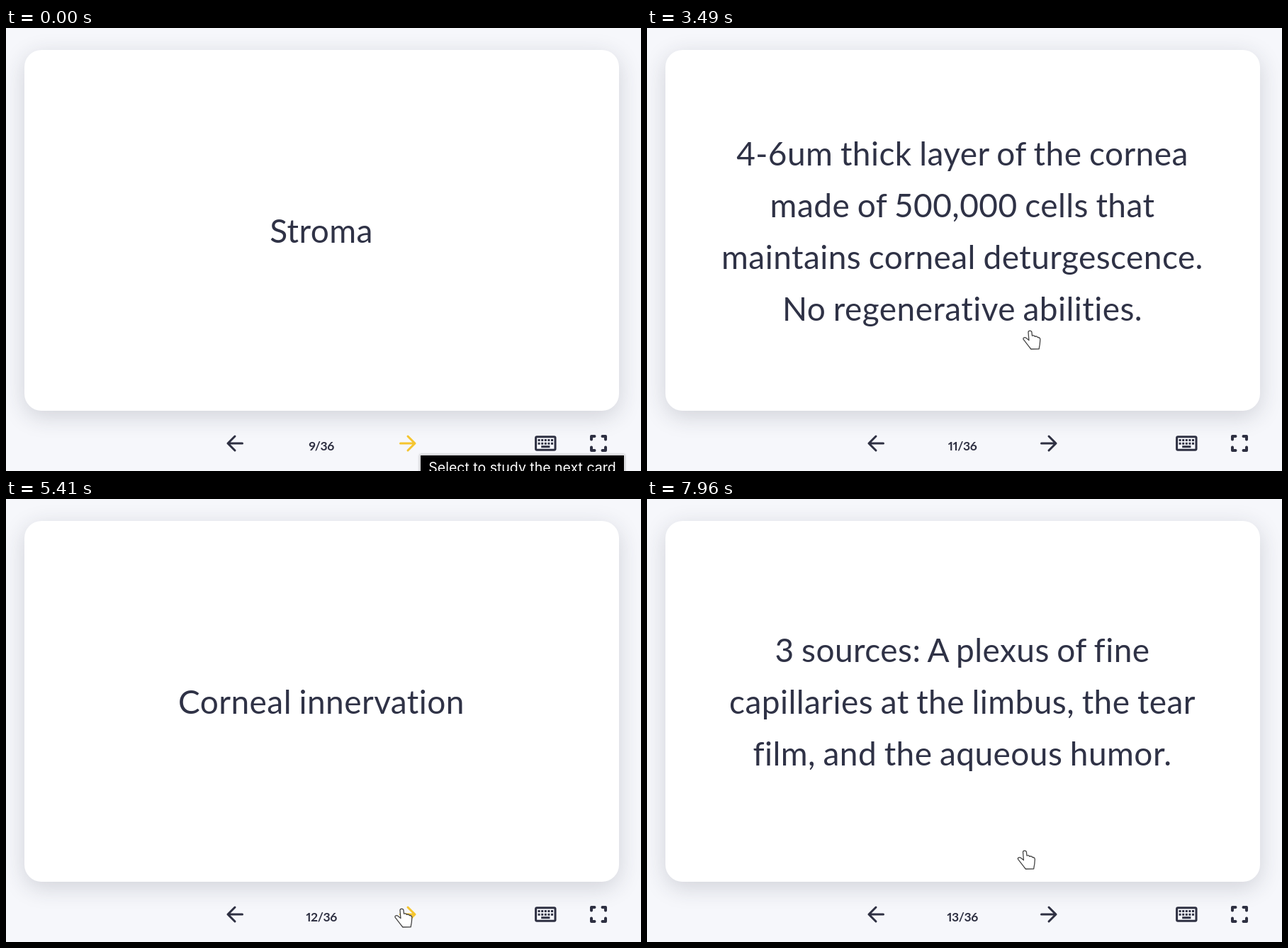
These frames come from a looping animation (896 px wide and 625 px high, 8000 ms). An HTML page:

```html
<!DOCTYPE html>
<html lang="en">
<head>
<meta charset="utf-8">
<title>Flashcards</title>
<style>
  html, body { margin: 0; width: 100%; height: 100%; overflow: hidden; background: #f6f7fb; }
  #stage { position: relative; width: 896px; height: 625px; overflow: hidden; background: #f6f7fb; color: #2f3246; }
  #card {
    position: absolute; left: 25.5px; top: 31px; width: 839px; height: 509px;
    display: flex; align-items: center; justify-content: center;
    border-radius: 24px; background: #fff; box-shadow: 0 8px 32px rgba(40, 46, 62, .18);
    font: 46px/73px Lato, sans-serif; letter-spacing: .45px; word-spacing: -1.7px;
    text-align: center; white-space: pre;
  }
  svg { position: absolute; left: 0; top: 0; }
  #count {
    font: 700 17.5px Lato, sans-serif; font-variant-numeric: proportional-nums; letter-spacing: -.4px;
    fill: #2e3042; text-anchor: middle;
  }
  #tip {
    position: absolute; left: 584px; top: 602px; width: 287px; height: 40px;
    border: 1px solid #e8e8ea; background: #000; color: #fff; box-shadow: 0 0 3px rgba(0, 0, 0, .4);
    font: 19.5px/34px Inter, sans-serif; text-align: center; white-space: nowrap;
  }
</style>
</head>
<body>
<div id="stage">
  <div id="card"></div>
  <svg width="896" height="625" fill="none" stroke="#2e3042" stroke-width="3" stroke-linecap="round" stroke-linejoin="round">
    <path d="M333.5 586H313M323 576L313 586L323 596"/>
    <path id="next" d="M556.5 586H577M567 576L577 586L567 596"/>
    <rect x="747.6" y="576.8" width="27.4" height="18.4" rx="1.5"/>
    <path d="M750.6 581.6H772.1M750.6 586.2H772.1" stroke-linecap="butt" stroke-dasharray="3 1.6"/>
    <path d="M755.2 590.7H767.4" stroke-linecap="butt"/>
    <path d="M826 580.5V576H830.5M841.5 576H846V580.5M846 591.5V596H841.5M830.5 596H826V591.5" stroke-width="4"/>
    <text id="count" x="445" y="596" stroke="none"></text>
  </svg>
  <div id="tip">Select to study the next card</div>
  <svg id="hand" width="28" height="30" fill="#fff" stroke="#444" stroke-width="1.3" stroke-linejoin="round" overflow="visible">
    <path d="M8.9 14.5L8 3.2C8 .4 12.5 .4 12.9 3.2L13.5 8.2C15 7.4 16.8 7.9 17.4 9.4C19 8.6 20.7 9.1 21.3 10.6C23.5 10.1 25 11.5 24.8 13.8L24.3 20C24 22.5 23.4 24 23.2 26.8L11.8 27C9 23.5 4 17 1 13.2C.2 11 3.3 9.9 4.9 11.2Z"/>
  </svg>
</div>
<script>
const $ = id => document.getElementById(id);
const LOOP = 8000, SLIDE = 320, FLIP = 390;
const YELLOW = [245, 197, 47], DARK = [46, 48, 66], OLIVE = [168, 163, 0];

const cards = [
  { at: 0, n: 9, front: "Stroma" },
  { at: 680, n: 10, front: "Descemet's membrane" },
  { at: 2010, n: 11, front: "Endothelium",
    back: "4-6um thick layer of the cornea\nmade of 500,000 cells that\nmaintains corneal deturgescence.\nNo regenerative abilities." },
  { at: 5090, n: 12, front: "Corneal innervation" },
  { at: 6260, n: 13, front: "Cornea is completely nourished by",
    back: "3 sources: A plexus of fine\ncapillaries at the limbus, the tear\nfilm, and the aqueous humor." }
];
const flips = [[3100, 1], [4160, -1], [7570, 1]];

// time, x, y of the pointer
const path = [
  [2910, 550, 565], [3090, 530, 426], [3490, 530, 426], [3610, 531, 414],
  [3730, 531, 414], [3850, 556, 503], [4540, 556, 503], [4680, 547.5, 540],
  [4790, 548, 577], [6940, 548, 577], [7150, 523, 446], [7760, 523, 446], [7950, 522.5, 495]
];

const clamp = v => Math.max(0, Math.min(1, v));
const mix = (a, b, k) => a + (b - a) * k;
const smooth = k => k * k * (3 - 2 * k);
const easeOut = k => 1 - (1 - k) ** 3;

function pointer(t) {
  const i = path.findIndex(p => p[0] > t);
  if (i < 0) return path[path.length - 1].slice(1);
  if (i === 0) return null;
  const a = path[i - 1], b = path[i], k = smooth((t - a[0]) / (b[0] - a[0]));
  return [mix(a[1], b[1], k), mix(a[2], b[2], k)];
}

function arrowColor(t) {
  if (t < 2860) return YELLOW;
  if (t < 2910) return OLIVE;
  const hover = clamp((t - 4760) / 120) - clamp((t - 6990) / 120);
  return DARK.map((v, i) => mix(v, YELLOW[i], hover));
}

function setText(el, text) {
  if (el.textContent !== text) el.textContent = text;
}

function draw(t) {
  const card = cards.filter(c => c.at <= t).pop();
  const slide = card.at ? 1 - easeOut(clamp((t - card.at) / SLIDE)) : 0;
  let turn = 0;
  for (const [at, dir] of flips)
    if (at >= card.at) turn += dir * 180 * smooth(clamp((t - at) / FLIP));

  const isBack = turn > 90, angle = isBack ? turn - 180 : turn;
  const el = $("card");
  setText(el, isBack ? card.back : card.front);
  el.style.opacity = 1 - .7 * slide;
  el.style.transform = angle || slide
    ? `perspective(1400px) translateX(${70 * slide}px) rotateY(${6 * slide}deg) rotateX(${angle}deg)`
    : "none";

  setText($("count"), card.n + "/36");
  $("next").style.stroke = `rgb(${arrowColor(t).map(Math.round)})`;
  $("tip").style.display = t < 530 ? "block" : "none";

  const p = pointer(t), hand = $("hand");
  hand.style.display = p ? "block" : "none";
  if (p) hand.style.transform = `translate(${p[0]}px, ${p[1]}px)`;
}

const start = performance.now();
function tick() {
  draw((performance.now() - start) % LOOP);
  requestAnimationFrame(tick);
}
tick();
</script>
</body>
</html>
```
